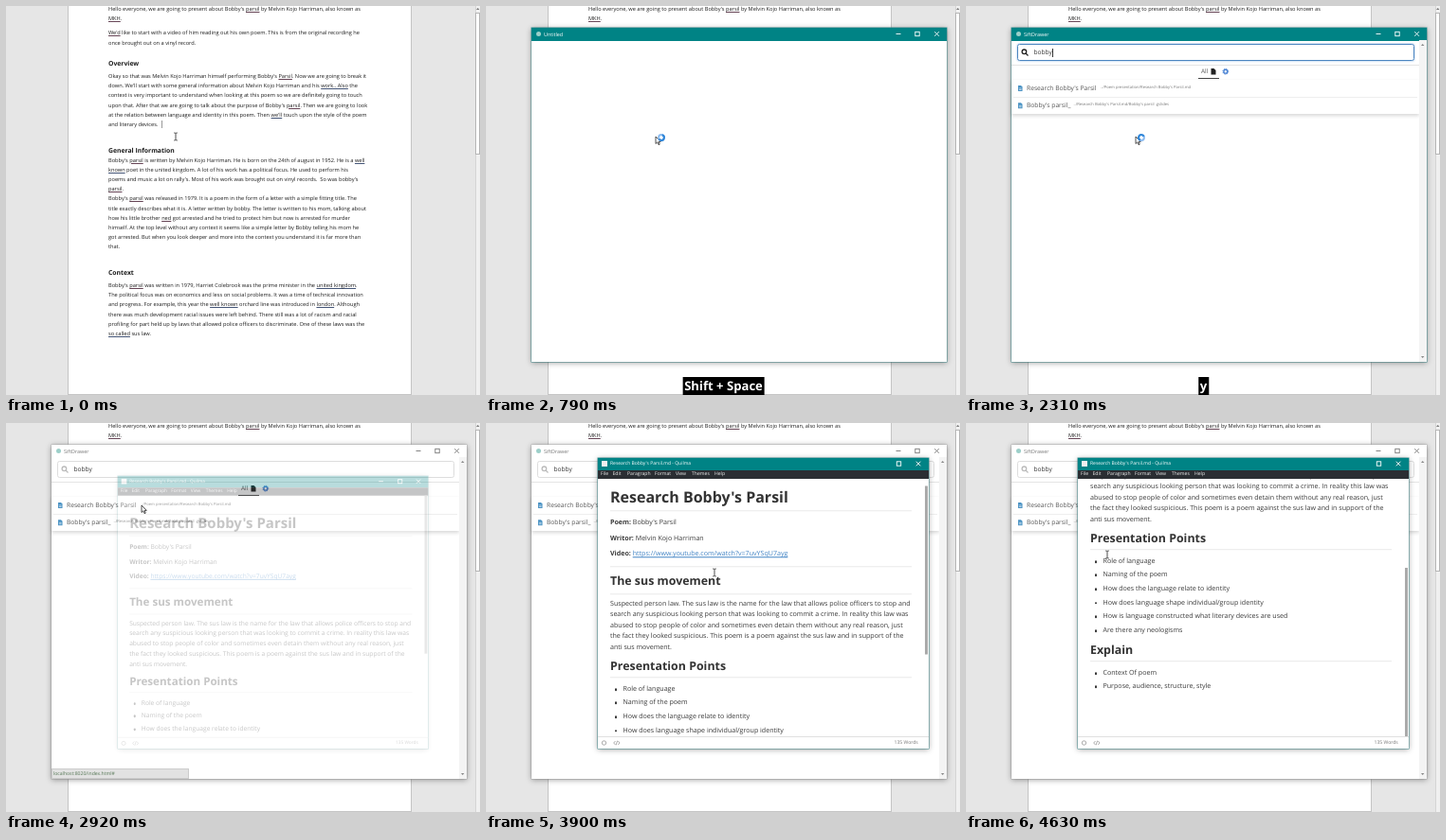
An HTML page for the animation above (4.68 s loop, 500 by 411 pixels).

```html
<!DOCTYPE html>
<html lang="en">
<head>
<meta charset="utf-8">
<style>
html, body { margin: 0; width: 100%; height: 100%; overflow: hidden; background: #e6e6e6; }
body { position: relative; font-family: "Open Sans", sans-serif; text-rendering: geometricPrecision; color: #3a3a3a; }
div, svg { position: absolute; box-sizing: border-box; }
.layer, svg { left: 0; top: 0; width: 500px; height: 411px; }
.t { white-space: pre; line-height: 0; }
u { text-decoration-thickness: .7px; text-underline-offset: 1px; text-decoration-color: #645; }
u.g { text-decoration-color: #457; }
svg { fill: none; overflow: visible; }
#page { color: #1c1c1c; }
#app { transform-origin: 267px 199.5px; }
#editor { transform-origin: 117px 344px; }
.bar { background: #008385; color: #fff; }
.frame { background: #fff; box-shadow: 0 1px 6px rgba(0,0,0,.38), 0 0 0 .5px #4a9da0; }
.caption, .buttons { color: #fff; }
.field { border: 1px solid #4d86c0; border-radius: 2.5px; box-shadow: 0 0 2px #6fa4dc; }
.lens { color: #222; }
.off .bar { background: #fff; }
.off .caption, .off .buttons { color: #777; }
.off .field { border-color: #ddd; box-shadow: none; }
.off .lens { color: #bbb; }
.off .frame { box-shadow: 0 1px 6px rgba(0,0,0,.38), 0 0 0 .5px #bbb; }
.card { background: #fff; box-shadow: 0 2px 4px rgba(0,0,0,.16); }
#view { clip-path: inset(59px 34px 80px 117px); }
#notes { top: -1.2px; }
#key { left: 250.5px; top: 392px; height: 19px; padding: 0 2px; transform: translateX(-50%); background: #000;
  color: #fff; font: bold 13.1px/18px "Open Sans", sans-serif; white-space: pre; }
</style>
</head>
<body>
<script>
const LOOP = 4680;
const box = (x, y, w, h, style = '', attrs = '') =>
  `<div ${attrs} style="left:${x}px;top:${y}px;width:${w}px;height:${h}px;${style}"></div>`;
// y is the middle of the capitals
const text = (x, y, size, str, style = '', attrs = 'class="t"') =>
  `<div ${attrs} style="left:${x}px;top:${y}px;font-size:${size}px;${style}">${str}</div>`;
const lines = (x, y, size, pitch, list, style) =>
  list.map((s, i) => text(x, y + i * pitch, size, s, style)).join('');
const svg = (inner, attrs = '') => `<svg ${attrs}>${inner}</svg>`;
const layer = (id, inner) => `<div class="layer" id="${id}">${inner}</div>`;
// _word_ marks spelling, *word* marks grammar
const marked = s => s.replace(/_(.+?)_/g, '<u>$1</u>').replace(/\*(.+?)\*/g, '<u class="g">$1</u>');

const minimise = (x, y) => `<path d="M${x - 2.5} ${y}h5"/>`;
const maxClose = (x, y) => `<rect x="${x - 2.2}" y="${y - 2.2}" width="4.4" height="4.4"/>
  <path d="M${x + 18.3} ${y - 2.3}l4.6 4.6m0-4.6l-4.6 4.6"/>`;
const stroke = 'stroke="currentColor" stroke-width=".9"';

// Word processor page
const paragraphs = [
  [3, `Hello everyone, we are going to present about Bobby's _parsil_ by Melvin Kojo Harriman, also known as
_MKH_.`],
  [28.3, `_We'd_ like to start with a video of him reading out his own poem. This is from the original recording he
once brought out on a vinyl record.`],
  [74, `Okay so that was Melvin Kojo Harriman himself performing Bobby's _Parsil_. Now we are going to break it
down. We'll start with some general information about Melvin Kojo Harriman and his *work.. Also* the
context is very important to understand when looking at this poem so we are definitely going to touch
upon that. After that we are going to talk about the purpose of Bobby's _parsil_. Then we are going to look
at the relation between language and identity in this poem. Then *we'll* touch upon the style of the poem
and literary devices.`],
  [162.5, `Bobby's _parsil_ is written by Melvin Kojo Harriman. He is born on the 24th of august in 1952. He is a *well*
*known* poet in the united kingdom. A lot of his work has a political focus. He used to perform his
poems and music a lot on rally's. Most of his work was brought out on vinyl records.  So was bobby's
_parsil_.
Bobby's _parsil_ was released in 1979. It is a poem in the form of a letter with a simple fitting title. The
title exactly describes what it is. A letter written by bobby. The letter is written to his mom, talking about
how his little brother _ned_ got arrested and he tried to protect him but now is arrested for murder
himself. At the top level without any context it seems like a simple letter by Bobby telling his mom he
got arrested. But when you look deeper and more into the context you understand it is far more than
that.`],
  [295, `Bobby's _parsil_ was written in 1979, Harriet Colebrook was the prime minister in the *united kingdom*.
The political focus was on economics and less on social problems. It was a time of technical innovation
and progress. For example, this year the *well known* orchard line was introduced in *london*. Although
there was much development racial issues were left behind. There still was a lot of racism and racial
profiling for part held up by laws that allowed police officers to discriminate. One of these laws was the
*so called* sus law.`]
];
const page =
  box(65, -2, 363, 412.5, 'background:#fff;border:1px solid #c4c4c4') +
  box(494.5, 0, 6, 411, 'background:#f0f0f0;border-left:1px solid #d4d4d4') +
  box(495, 7, 5, 150, 'background:#fff;border:.8px solid #b5b5b5') +
  svg('<path d="M496 4l1.7-2 1.7 2z" fill="#777"/>') +
  paragraphs.map(([y, s]) => lines(108, y, 5.67, 10.22, marked(s).split('\n'))).join('') +
  [['Overview', 62], ['General Information', 153.6], ['Context', 283]]
    .map(([s, y]) => text(108, y, 6.84, s, 'font-weight:bold')).join('') +
  box(164, 121, .8, 8, 'background:#999', 'id="pageCaret"');

// Search window
const fileIcon = y => `<path d="M55 ${y - 3}h3l1.5 1.5v4.5h-4.500z" fill="#4b93c4"/>
  <path d="M56 ${y}h2.500m-2.500 1.500h2.500" stroke="#fff" stroke-width=".6"/>`;
const results =
  box(48, 78, 430, 36, '', 'class="card"') +
  box(50, 96, 426, .6, 'background:#eee') +
  svg(fileIcon(87) + fileIcon(105.3)) +
  text(64, 87, 6.7, "Research Bobby's Parsil", 'color:#555') +
  text(142, 87, 4.15, "../Poem presentation/Research Bobby's Parsil.md", 'color:#777') +
  text(64, 105.3, 6.7, "Bobby's parsil_", 'color:#555') +
  text(113.5, 105.3, 4.15, "../Research Bobby's Parsil.md/Bobby's parsil .gslides", 'color:#777');
const search =
  box(54, 40, 419, 18, '', 'class="field"') +
  svg(`<circle cx="61.400" cy="48.300" r="2.300"/><path d="M63 50l2.500 2.500"/>`,
    'class="lens" stroke="currentColor" stroke-width="1.300"') +
  text(71.5, 49, 6.6, '', 'color:#333', 'class="t" id="query"') +
  box(0, 44.5, .7, 9, 'background:#333', 'id="queryCaret"') +
  box(48, 61.5, 430, .7, 'background:#e4e4e4') +
  text(248, 69.3, 6.4, 'All', 'color:#555') +
  box(245, 76.4, 22, .9, 'background:#444') +
  svg(`<path d="M258.500 66h3l2 2v4.500h-5z" fill="#222"/>
    <circle cx="273.800" cy="69.200" r="1.900" stroke="#4a83d4" stroke-width="1.400"/>
    <circle cx="273.800" cy="69.200" r="2.900" stroke="#4a83d4" stroke-width="1" stroke-dasharray="1.150"/>`) +
  `<div id="empty">${box(48, 78, 430, 18, '', 'class="card"')}${text(53.5, 87, 6.75, 'Start searching to find!', 'color:#456')}</div>` +
  `<div id="results">${results}</div>` +
  box(478, 36, 7.5, 339.5, 'background:#f4f4f4') +
  svg('<path d="M480 42l1.700-2 1.700 2zM480 370l1.700 2 1.700-2z" fill="#888"/>');
const app =
  box(48, 23, 438, 353, '', 'class="frame"') +
  box(48, 23, 438, 13.5, '', 'class="bar"') +
  box(52.5, 26.8, 5.6, 5.6, 'background:#9ccfc9;border-radius:50%') +
  text(61, 29.5, 5.4, '', '', 'class="t caption" id="caption"') +
  svg(minimise(435, 29.5) + maxClose(455, 29.5), `class="buttons" ${stroke}`) +
  `<div id="search">${search}</div>` +
  `<div id="link">${box(48, 365, 145, 11, 'background:#e2e2e2;border:.5px solid #ccc')}${text(50, 370.5, 5.1, 'localhost:8020/index.html#', 'color:#575')}</div>`;

// Markdown editor
const rule = y => box(131, y, 318, .8, 'background:#e9e9e9');
const heading = (y, size, s) => text(131, y, size, s, 'font-weight:bold;color:#333');
const bullets = (y, list) => lines(144.5, y, 7.1, 14.65, list) +
  list.map((_, i) => box(135.7, y + i * 14.65 - 1, 2.7, 2.7, 'background:#333;border-radius:50%')).join('');
const notes =
  heading(91, 16, "Research Bobby's Parsil") + rule(105) +
  lines(131, 118, 7.1, 16.8, ["<b>Poem:</b> Bobby's Parsil", '<b>Writor:</b> Melvin Kojo Harriman',
    '<b>Video:</b> <span style="color:#4183c4;text-decoration:underline .6px">https://www.youtube.com/watch?v=7uvYSqU7ayg</span>']) +
  rule(164) + heading(180, 12.4, 'The sus movement') + rule(193) +
  lines(131, 204.3, 7.1, 11.37, [
    'Suspected person law. The sus law is the name for the law that allows police officers to stop and',
    'search any suspicious looking person that was looking to commit a crime. In reality this law was',
    'abused to stop people of color and sometimes even detain them without any real reason, just',
    'the fact they looked suspicious. This poem is a poem against the sus law and in support of the',
    'anti sus movement.']) +
  heading(270, 12.4, 'Presentation Points') + rule(281) +
  bullets(294, ['Role of language', 'Naming of the poem', 'How does the language relate to identity',
    'How does language shape individual/group identity',
    'How is language constructed what literary devices are used', 'Are there any neologisms']) +
  heading(388, 12.4, 'Explain') + rule(399) +
  bullets(412, ['Context Of poem', 'Purpose, audience, structure, style']);
const menu = [['File', 121], ['Edit', 133.5], ['Paragraph', 149], ['Format', 178], ['View', 200], ['Themes', 217], ['Help', 241]];
const editor =
  box(117.5, 36.5, 349, 307.5, '', 'class="frame"') +
  box(117.5, 36.5, 349, 13, '', 'class="bar"') +
  box(122, 40.3, 5.5, 5.5, 'background:#eee') +
  text(131, 43, 5, "Research Bobby's Parsil.md - Quilma", 'color:#fff') +
  svg(minimise(414, 43), `id="min" color="#fff" ${stroke}`) +
  svg(maxClose(435.5, 43), `color="#fff" ${stroke}`) +
  box(117.5, 49.5, 349, 9.5, 'background:#2b2e33') +
  menu.map(([s, x]) => text(x, 54.3, 5.1, s, 'color:#eee')).join('') +
  `<div class="layer" id="view">${layer('notes', notes)}</div>` +
  box(463, 59, 3, 178, 'background:#aaa', 'id="thumb"') +
  box(117.5, 331, 349, .7, 'background:#e0e0e0') +
  svg(`<circle cx="124.500" cy="338" r="2.200"/>
    <path d="M136.500 336l-1.800 2 1.800 2m2.800-4l1.800 2-1.800 2m-.7-4.300l-1.400 4.600"/>`, 'stroke="#888" stroke-width=".7"') +
  text(430.5, 338, 5.1, '135 Words', 'color:#777');

const pointer =
  `<g id="beam" stroke="#222" stroke-width=".8"><path d="M-1.800-4q1.300 0 1.800.6q.500-.6 1.800-.6M-1.800 4q1.300 0 1.800-.6q.500.6 1.800.6M0-3.500v7"/></g>
  <path id="arrow" d="M0 0v7.500l1.800-1.600 1.300 2.800 1.200-.6-1.300-2.700h2.300z" fill="#fff" stroke="#222" stroke-width=".8"/>
  <g id="busy" transform="translate(6 1)" stroke-width="2"><circle r="2.900" stroke="#8dbcf0"/>
  <circle id="spin" r="2.900" stroke="#2f86d8" stroke-dasharray="11 7.220"/></g>`;

document.body.innerHTML = layer('page', page) + layer('app', app) + layer('editor', editor) +
  svg(`<g id="pointer">${pointer}</g>`) + '<div id="key"></div>';
const el = Object.fromEntries([...document.querySelectorAll('[id]')].map(e => [e.id, e]));

const clamp = p => Math.max(0, Math.min(1, p));
const smooth = p => p * p * (3 - 2 * p);
const show = (e, on) => { e.style.display = on ? '' : 'none'; };
const KEYS = [[240, 'Shift + Space'], [1300, 'b'], [1560, 'o'], [1780, 'b'], [2000, 'b'], [2220, 'y'], [2500, '']];
const PATH = [[0, 179, 138], [2380, 179, 138], [2530, 143, 87], [3470, 143, 87], [3800, 241, 158],
  [4200, 241, 158], [4540, 155, 138], [4630, 149, 139], [LOOP, 149, 139]];

function pointerAt(t) {
  const i = PATH.findIndex(p => p[0] > t);
  const [t0, x0, y0] = PATH[i - 1], [t1, x1, y1] = PATH[i];
  const p = smooth((t - t0) / (t1 - t0));
  return [x0 + (x1 - x0) * p, y0 + (y1 - y0) * p];
}

function openWindow(win, t, start) {
  const p = clamp((t - start) / 250);
  show(win, p > 0);
  win.style.opacity = clamp(p * 1.3);
  win.style.transform = `scale(${1 - .1 * (1 - p) ** 2})`;
}

function draw(t) {
  show(el.pageCaret, t < 50);

  const pressed = KEYS.filter(k => k[0] <= t);
  const key = pressed.length ? pressed[pressed.length - 1][1] : '';
  show(el.key, key);
  el.key.textContent = key;

  openWindow(el.app, t, 430);
  const loaded = t >= 1000, found = t >= 1640;
  el.app.className = t >= 2870 ? 'layer off' : 'layer';
  el.caption.textContent = loaded ? 'SiftDrawer' : 'Untitled';
  show(el.search, loaded);
  el.query.textContent = pressed.slice(1).map(k => k[1]).join('');
  el.queryCaret.style.left = 72 + el.query.offsetWidth + 'px';
  show(el.queryCaret, t < 2720);
  show(el.empty, !found);
  show(el.results, found);
  show(el.link, t >= 2500 && t < 3300);

  openWindow(el.editor, t, 2868);
  show(el.min, t < 3300);
  const scroll = smooth(clamp((t - 3790) / 640));
  el.notes.style.transform = `translateY(${-146.8 * scroll}px)`;
  el.thumb.style.transform = `translateY(${94 * scroll}px)`;

  const beam = t < 430 || t >= 2950;
  show(el.beam, beam);
  show(el.arrow, !beam);
  show(el.busy, t >= 430 && t < 2380);
  el.spin.setAttribute('transform', `rotate(${t * .36})`);
  el.pointer.setAttribute('transform', `translate(${pointerAt(t)})`);
}

const began = performance.now();
function tick() {
  draw((performance.now() - began) % LOOP);
  requestAnimationFrame(tick);
}
tick();
</script>
</body>
</html>
```
